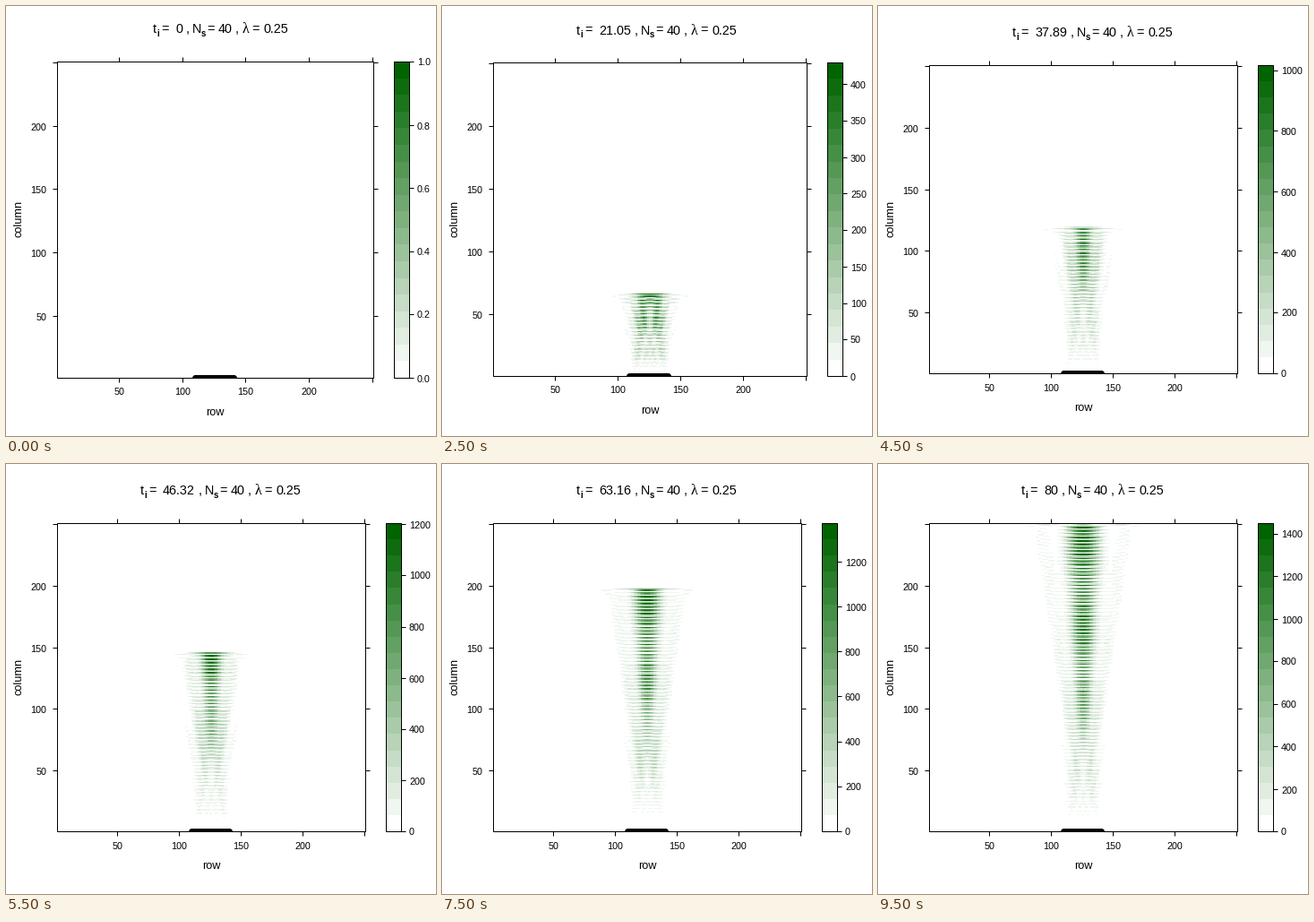
A matplotlib script that plays this animation: 480 by 480 pixels, repeating every 10000 ms.

```python
import math

import matplotlib.pyplot as plt
import numpy as np
from matplotlib.animation import FuncAnimation
from matplotlib.patches import Rectangle

STAGE = 480
DPI = 80
PT = 72 / DPI                     # points per pixel
FRAMES = 20
CELLS = 250
CELL = 0.08                       # grid spacing, in length units
SOURCES = 40
WAVELENGTH = 0.25
T_END = 80
BANDS = 19
LEFT = 57                         # pixel column of the panel's left line
EDGE = 0.4                        # filled areas start inside their outline
TICK = 5
SMALL, MEDIUM, LARGE = 10.8, 12.7, 14.4

mix = np.linspace(0, 1, BANDS)[:, None]
palette = (1 - mix) * np.array([1, 1, 1]) + mix * np.array([0, 100 / 255, 0])

# Distance from every source to every cell
offsets = (np.arange(SOURCES) - SOURCES // 2) * WAVELENGTH / 4
axis = np.arange(CELLS) * CELL
source_x = CELLS * CELL / 2 + offsets
distance = np.hypot(axis[None, None, :] - source_x[:, None, None],
                    axis[None, :, None])

fig = plt.figure(figsize=(STAGE / DPI, STAGE / DPI), dpi=DPI, facecolor="white")
ax = fig.add_axes([0, 0, 1, 1])


def intensity(t):
    """Squared sum of all wavelets that have reached each cell by time t."""
    waves = np.sin(2 * np.pi * (t - distance / WAVELENGTH))
    waves[distance > t * WAVELENGTH] = 0
    return waves.sum(axis=0) ** 2


def pretty_step(top, count=7):
    cell = top / count
    base = 10 ** math.floor(math.log10(cell) + 1e-9)
    step = base
    for factor, bias in ((2, 1.5), (5, 2.75), (10, 1.5)):
        if factor * base - cell < bias * (cell - step):
            step = factor * base
        else:
            break
    return step


def write(x, y, string, size, align="left", font="Liberation Sans", **style):
    ax.text(x, y, string, fontsize=size * PT, family=font, ha=align,
            va="baseline", color="black", **style)


# Outlines take whole pixel numbers; the renderer snaps them to pixel centres
def line(x0, y0, x1, y1):
    ax.plot([x0, x1], [y0, y1], color="black", lw=PT, solid_capstyle="butt")


def frame_box(x, y, w, h):
    return ax.add_patch(Rectangle((x, y), w, h, fill=False, ec="black",
                                  lw=PT, zorder=4))


def picture(rgb, x, y, w, h):
    ax.imshow(rgb, extent=(x + EDGE, x + w + EDGE, y + h + EDGE, y + EDGE),
              origin="lower", interpolation="nearest", aspect="auto", zorder=0)


def draw_title(t, baseline):
    number = f"{round(t, 2):g}"
    number_width = sum(4 if c == "." else 8 for c in number)
    x = 239.5 - (143 + number_width) / 2
    end = x + 25 + number_width
    for px, string in ((x, "t"), (x + 9, "="), (x + 25, number),
                       (end + 3.5, ","), (end + 11, "N"), (end + 27.5, "="),
                       (end + 40, "40"), (end + 59, ","), (end + 77, "="),
                       (end + 90, "0.25")):
        write(px, baseline, string, LARGE)
    for px, string in ((x + 4, "i"), (end + 21, "s")):
        write(px, baseline + 3.5, string, 9.6, weight="bold")
    write(end + 67, baseline, "λ", 16, font="Liberation Serif")


def draw_axes(top, bottom, side):
    right = LEFT + side
    scale = side / CELLS
    for value in range(50, CELLS + 1, 50):
        x = math.floor(LEFT + (value - 0.5) * scale - 0.25)
        y = round(bottom + EDGE - (value - 0.5) * scale)
        line(x, bottom, x, bottom + TICK)
        line(x, top, x, top - TICK)
        line(LEFT, y, LEFT - TICK, y)
        line(right, y, right + TICK, y)
        if value < CELLS:
            write(x + 0.2, bottom + 19.5, str(value), SMALL, "center")
            write(45, y + 5, str(value), SMALL, "right")
    write(LEFT + side / 2, bottom + 42, "row", MEDIUM, "center")
    write(17.5, (top + bottom) / 2 - 1, "column", MEDIUM, "center",
          rotation=90, rotation_mode="anchor")


def draw_key(x, top, height, peak, ticks, labels):
    picture(palette[:, None, :], x, top, 17, height)
    frame_box(x, top, 17, height)
    for value, label in zip(ticks, labels):
        y = round(top + height * (1 - value / peak))
        line(x + 17, y, x + 17 + TICK, y)
        write(x + 26, y + 4.5, label, SMALL)


def update(i):
    ax.clear()
    ax.axis("off")
    t = T_END * i / (FRAMES - 1)
    field = intensity(t)
    peak = field.max() if i else 1.0

    step = pretty_step(peak)
    ticks = np.arange(0, peak * (1 + 1e-9), step)
    labels = [f"{v:.1f}" if step < 1 else f"{v:.0f}" for v in ticks]
    label_width = max(sum(3 if c == "." else 6 for c in s) for s in labels)

    side = 368 - label_width
    top = math.floor(238.5 - side / 2)
    bottom = top + side

    band = np.minimum((field / peak * BANDS).astype(int), BANDS - 1)
    picture(palette[band], LEFT, top, side, side)
    panel = frame_box(LEFT, top, side, side)

    scale = side / CELLS
    dots_x = LEFT + (CELLS / 2 + offsets / CELL - 0.5) * scale
    dots_y = np.full(SOURCES, bottom + 0.5 - 0.5 * scale)
    dots, = ax.plot(dots_x, dots_y, "o", color="black", ms=7 * PT, mew=0)
    dots.set_clip_path(panel)

    draw_axes(top, bottom, side)
    draw_key(LEFT + side + 23, top, side, peak, ticks, labels)
    draw_title(t, top - 31.5)
    ax.set_xlim(0, STAGE)
    ax.set_ylim(STAGE, 0)
    return []


anim = FuncAnimation(fig, update, frames=FRAMES, interval=500,
                     init_func=lambda: [], repeat=True, repeat_delay=0)
plt.show()
```
